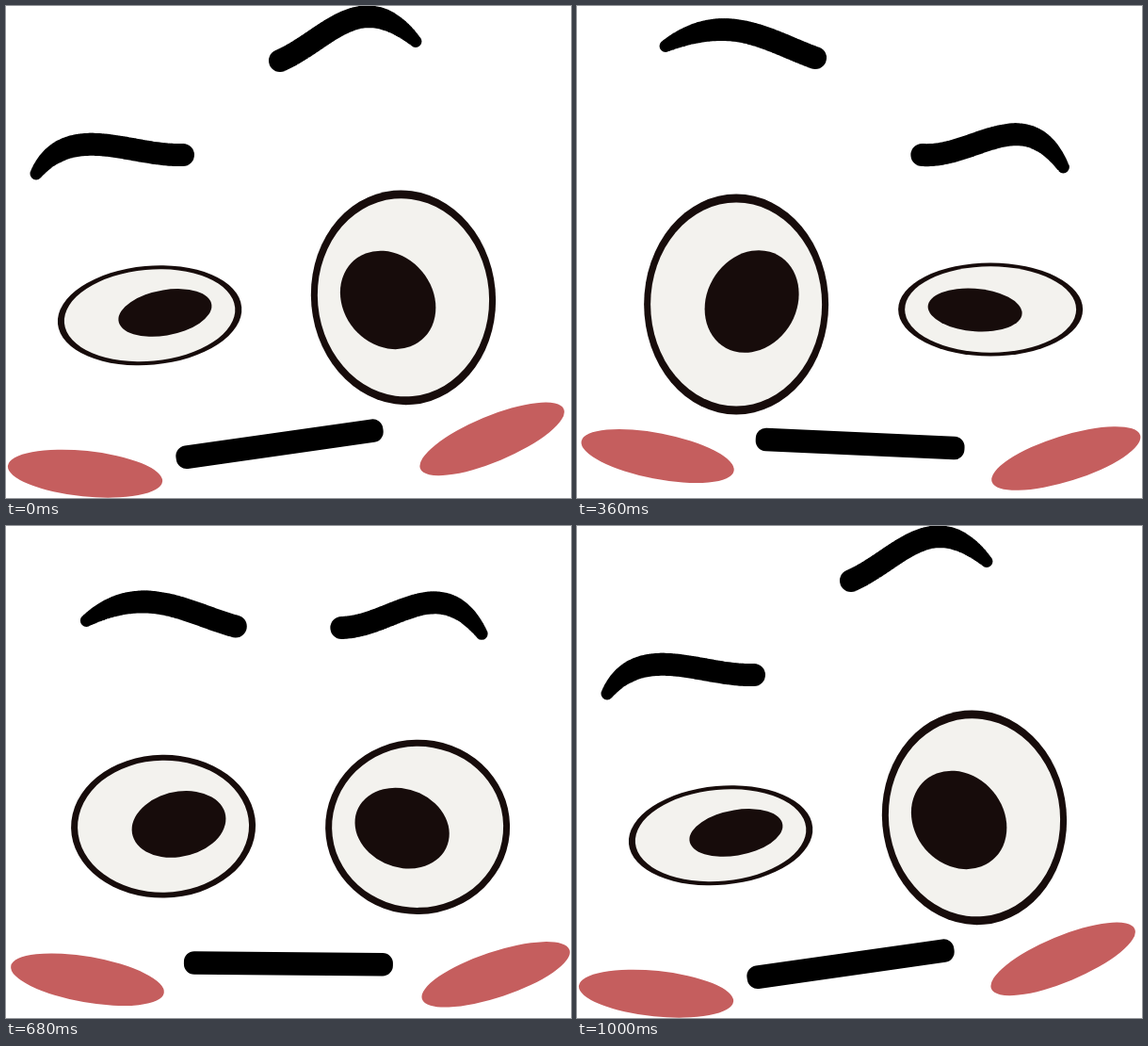
Recreate the animation shown at these times as an HTML page with a canvas. Size 600 by 522 pixels, loop 1.04 s.

```html
<!DOCTYPE html>
<html lang="en">
<head>
<meta charset="utf-8">
<title>Sceptical face</title>
<style>
  html, body { margin: 0; width: 100%; height: 100%; overflow: hidden; background: #fff; }
  canvas { display: block; }
</style>
</head>
<body>
<canvas id="stage" width="600" height="522"></canvas>
<script>
const ctx = document.getElementById('stage').getContext('2d');
const LOOP = 1040, STEP = 40, TAU = Math.PI * 2;
const INK = '#170c0b', EYE_WHITE = '#f3f2ee', BLUSH = '#c55e5e';

// Brow spines as cubic control points: upright pose, leaning pose.
const leftSpine = [[[-50, -18], [-92, -50], [-159, -12.5]],
                   [[-55, 2], [-120, -37], [-156, 20]]];
const rightSpine = [[[55, 4], [108, -59], [150, 13]],
                    [[52, -23], [85, -80], [144, -20.5]]];

const mix = (a, b, k) => a + (b - a) * k;
const rad = deg => deg * Math.PI / 180;

function ease(t, from, to) {
  const u = Math.min(1, Math.max(0, (t - from) / (to - from)));
  return u * u * (3 - 2 * u);
}

// Goes 0 to 1 within the time outEnd, then back to 0.
const swing = (t, outEnd, backStart, backEnd) => ease(t, 0, outEnd) - ease(t, backStart, backEnd);

function turn(x, y, deg) {
  ctx.translate(x, y);
  ctx.rotate(rad(deg));
  ctx.translate(-x, -y);
}

function oval(x, y, rx, ry, color, deg = 0) {
  ctx.fillStyle = color;
  ctx.beginPath();
  ctx.ellipse(x, y, rx, ry, rad(deg), 0, TAU);
  ctx.fill();
}

// side is 1 for the left eye and -1 for the right one.
function eye(x, y, height, side, pupilY) {
  ctx.save();
  ctx.translate(x, y);
  ctx.scale(1, height / 233);
  oval(0, 0, 98, 116.5, INK);
  oval(0, 0, 91, 107.5, EYE_WHITE);
  ctx.translate(16.5 * side, pupilY);
  ctx.transform(1, -.16 * side, 0, 1, 0, 0);
  oval(0, 0, 50, 53.5, INK);
  ctx.restore();
}

function brow(x, y, [upright, leaning], lean) {
  const [a, b, c] = upright.map((p, i) => p.map((n, j) => mix(n, leaning[i][j], lean)));
  ctx.fillStyle = '#000';
  ctx.beginPath();
  for (let i = 0; i <= 100; i++) {
    const u = i / 100, v = 1 - u;
    const at = j => 3 * v * v * u * a[j] + 3 * v * u * u * b[j] + u ** 3 * c[j];
    const r = 12 - 5.5 * Math.max(0, (u - .55) / .45) ** 3;
    const px = x + at(0), py = y + at(1);
    ctx.moveTo(px + r, py);
    ctx.arc(px, py, r, 0, TAU);
  }
  ctx.fill();
}

function mouth(lean) {
  ctx.save();
  turn(302, 532, -5.5 * lean);
  turn(302, 464.5, 2.6);
  ctx.fillStyle = '#000';
  ctx.beginPath();
  ctx.roundRect(191, 452.2, 222, 24.6, 11);
  ctx.fill();
  ctx.restore();
}

function draw(t) {
  const upright = swing(t, 350, 580, 930), lean = 1 - upright;
  const drift = swing(t, 430, 570, 950);
  const rightDrift = swing(t, 380, 600, 940);
  const hop = swing(t, 225, 520, 840);
  const overshoot = swing(t, 200, 200, 360);
  const leftOpen = swing(t, 240, 520, 790);
  const rightShut = swing(t, 262, 477, 807);

  ctx.fillStyle = '#fff';
  ctx.fillRect(0, 0, 600, 522);

  ctx.save();
  ctx.translate(.4 + 25 * (drift - upright), 0);
  turn(291, 524, -5.2 * lean);
  oval(87, 477.5, 82.5, 24.2, BLUSH, 11);
  oval(520.7, 480, 82.5, 24.2, BLUSH, -17.4);
  eye(170.5, 316.5, mix(105, 234, leftOpen), 1, -3);
  eye(440.5, 322, mix(228, 99, rightShut), -1, 1.2);
  mouth(lean);
  ctx.restore();

  brow(mix(188, 258, drift), mix(158, 55, hop), leftSpine, lean);
  brow(mix(291, 367, rightDrift), mix(58, 158, hop + .14 * overshoot), rightSpine, lean);
}

const start = performance.now();
function tick() {
  const t = (performance.now() - start) % LOOP;
  draw(Math.floor(t / STEP) * STEP);
  requestAnimationFrame(tick);
}
tick();
</script>
</body>
</html>
```
